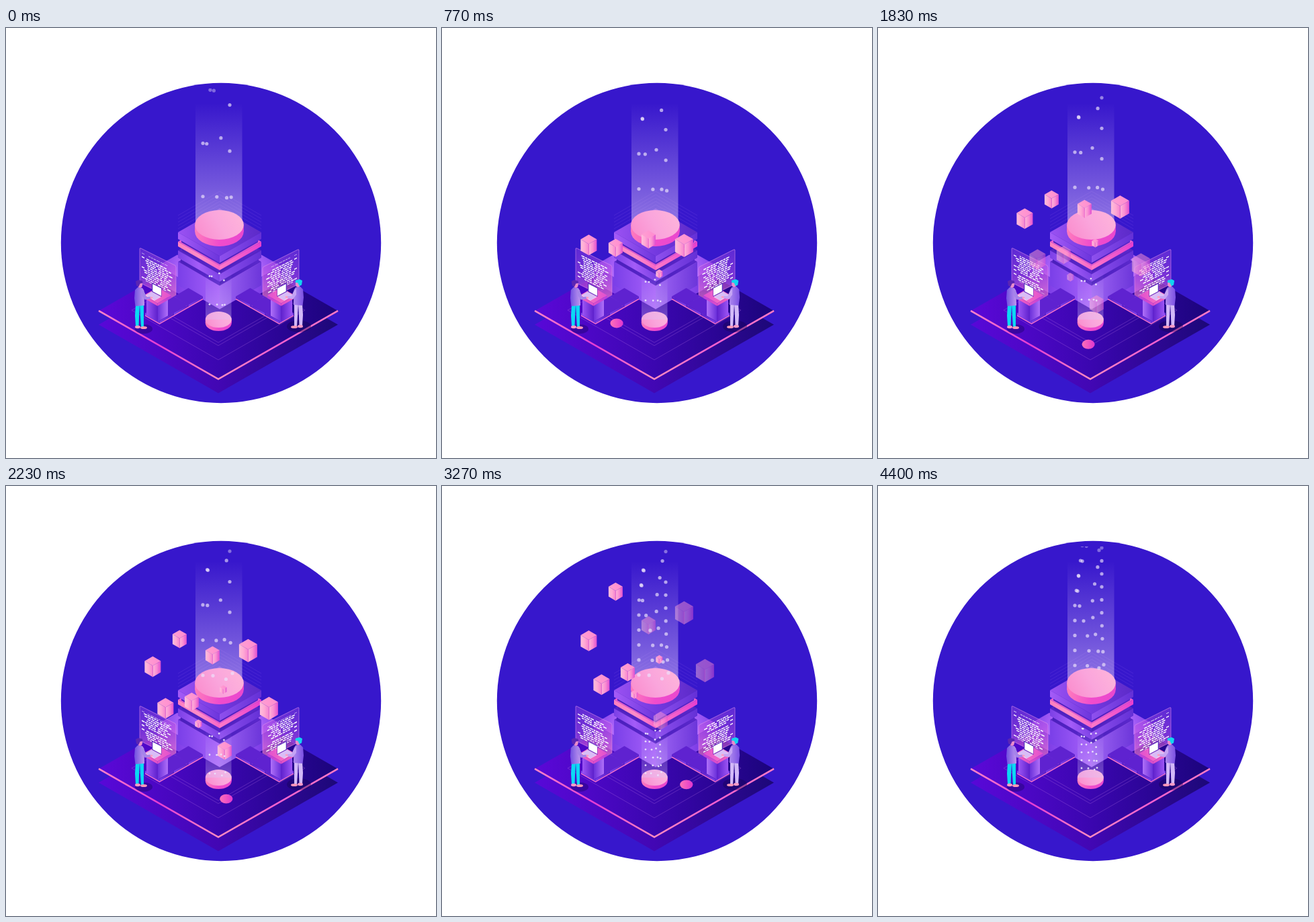
Animation, 640 px wide and 640 px high, one loop 4430 ms. Source, as an HTML page with a canvas:

```html
<!DOCTYPE html>
<html lang="en">
<head>
<meta charset="utf-8">
<title>Data tower</title>
<style>
  html, body { margin: 0; width: 100%; height: 100%; overflow: hidden; background: #fff; }
  canvas { display: block; width: 640px; height: 640px; }
</style>
</head>
<body>
<canvas id="stage" width="640" height="640"></canvas>
<script>
const LOOP = 4430;
const SLOPE = .573; // rise per pixel of every isometric edge
const ctx = document.getElementById('stage').getContext('2d');

// ---------- helpers ----------
const clamp = v => Math.max(0, Math.min(1, v));

function grad(x1, y1, x2, y2, ...colors) {
  const g = ctx.createLinearGradient(x1, y1, x2, y2);
  colors.forEach((c, i) => g.addColorStop(i / (colors.length - 1), c));
  return g;
}
const across = (x1, x2, ...colors) => grad(x1, 0, x2, 0, ...colors);

function poly(points, fill) {
  ctx.fillStyle = fill;
  ctx.fill(new Path2D('M' + points + 'Z'));
}
function line(points, stroke, width) {
  ctx.strokeStyle = stroke;
  ctx.lineWidth = width;
  ctx.stroke(new Path2D('M' + points));
}
function oval(x, y, rx, ry, fill) {
  ctx.fillStyle = fill;
  ctx.beginPath();
  ctx.ellipse(x, y, rx, ry, 0, 0, 7);
  ctx.fill();
}
function group(draw) {
  ctx.save();
  draw();
  ctx.restore();
}
function mirrored(draw, dx = 0, dy = 0) {
  group(() => {
    ctx.translate(635 + dx, dy);
    ctx.scale(-1, 1);
    draw();
  });
}

const diamond = (x, y, r) =>
  `${x - r},${y} ${x},${y - r * SLOPE} ${x + r},${y} ${x},${y + r * SLOPE}Z`;

// Isometric box from its left top corner: a runs to the front, b from there to the right.
function box(x, y, a, b, h, top, left, right) {
  const fx = x + a, fy = y + a * SLOPE, rx = fx + b, ry = fy - b * SLOPE;
  poly(`${x},${y} ${x + b},${y - b * SLOPE} ${rx},${ry} ${fx},${fy}`, top);
  poly(`${x},${y} ${fx},${fy} ${fx},${fy + h} ${x},${y + h}`, across(x, fx, ...left));
  poly(`${fx},${fy} ${rx},${ry} ${rx},${ry + h} ${fx},${fy + h}`, across(fx, rx, ...right));
}

// ---------- floor ----------
function floor() {
  oval(320, 320, 238.2, 238.2, '#3717cc');
  poly(diamond(316, 441.5, 178), across(138, 494, '#5808d8', '#4207b4', '#1c0878'));
  poly(diamond(316, 421, 178), across(138, 494, '#5b08d8', '#3b06b0', '#1b047c'));
  line('138,420.8 316,522.6 494,420.8',
    across(138, 494, '#ff86c8', '#e43bd4', '#ff8cc0', '#f45fd0', '#ff7cc4'), 2.6);
  for (const r of [129, 92, 84]) line(diamond(316, 420, r), 'rgba(190,120,230,.42)', .7);
  oval(205, 448, 13, 7, 'rgba(30,5,110,.45)');
  oval(436, 444, 18, 9, 'rgba(20,4,80,.4)');
}

// A puck slides down to the front corner, then up the other side.
function puck(t) {
  const d = (t - 1890) * (t < 1890 ? .05 : .0346);
  const x = 316 + d, y = 472.5 - Math.abs(d) * .59;
  oval(x, y, 9.6, 6.9, across(x - 9, x + 9, '#ff6fb8', '#e038cf'));
}

// ---------- tower ----------
function slab(y, h, top, left, right, inset = 0) {
  const r = 62 - inset;
  box(318 - r, y, r, r, h, top, left, right);
}
function wing() {
  box(226, 354, 46, 29, 24, grad(226, 340, 300, 370, '#7a38e6', '#b169fb', '#9553f0'),
    ['#6426d6', '#8e4cf0'], ['#a45cf6', '#7d3fe4']);
}
function tower() {
  wing();
  mirrored(wing);
  const dark = ['#4a1fbc', '#5a28cc'], violet = ['#7a3fe8', '#a862fa'], shade = ['#8f50ee', '#6430d6'];
  slab(348, 35, '#5a27c8', violet, ['#a066f4', '#6c36da']);
  slab(338, 11, '#5a27c8', dark, dark, 4);
  slab(331, 11, '#5524c4', ['#7c40e6', '#a45cf8', '#7a3ee4'], shade);
  slab(322, 10, '#4a1fbc', dark, dark, 6);
  slab(318, 7, '#e85ad0', ['#ff7fbe', '#ff8cc8', '#f866c8'], ['#ff79c8', '#e63fcf']);
  slab(310, 9, '#4a1fbc', dark, dark, 5);
  slab(304, 10, across(256, 380, '#9b52f2', '#7439e0', '#5c2ac8'), ['#a55cf8', '#6c35dc'], shade);
  for (let y = 299; y > 278; y -= 5)
    line(`256,${y} 318,${y - 36} 380,${y}`, 'rgba(165,110,240,.24)', .7);
}
function beam(x, y, w, h, alpha) {
  ctx.fillStyle = grad(0, y, 0, y + h, 'rgba(218,195,248,0)', `rgba(218,195,248,${alpha})`);
  ctx.fillRect(x, y, w, h);
}
function disc(x, y, rx, ry, h) {
  const side = across(x - rx, x + rx, '#ff7cbc', '#f04ccc', '#ea48ce');
  oval(x, y + h, rx, ry, side);
  ctx.fillStyle = side;
  ctx.fillRect(x - rx, y, rx * 2, h);
  oval(x, y, rx, ry, grad(x - rx, y + ry, x + rx, y - ry, '#fa8acb', '#faa5dc', '#ffb6da'));
}

// ---------- code screens ----------
function random(seed) {
  return () => (seed = (seed * 16807) % 2147483647) / 2147483647;
}
const ROWS = 13, PITCH = 3, CYCLE = (ROWS + 1) * PITCH;

function codeRows(rnd) {
  return Array.from({ length: ROWS }, (_, i) => {
    const last = i === ROWS - 1;
    const row = last || i % 5 === 0 ? [[3, 4]] : [];
    const end = last ? 40 : 36 + rnd() * 13;
    for (let x = last ? 13 : 6 + rnd() * 6, w; x < end; x += w + (rnd() < .12 ? 3 : 1)) {
      w = 2 + rnd() * 3.5;
      row.push([x, w]);
    }
    return row;
  });
}
const code = codeRows(random(4711));

function screen(t) {
  ctx.transform(1, .5, 0, 1, 199, 327);
  ctx.beginPath();
  ctx.roundRect(0, 0, 54, 52, 2);
  ctx.fillStyle = grad(0, 0, 40, 56, 'rgba(150,70,225,.4)', 'rgba(190,80,225,.5)', 'rgba(255,130,205,.65)');
  ctx.fill();
  ctx.strokeStyle = 'rgba(225,145,235,.6)';
  ctx.lineWidth = .9;
  ctx.stroke();
  ctx.beginPath();
  ctx.rect(1, 6, 52, 39);
  ctx.clip();
  ctx.fillStyle = '#fff';
  const scroll = (1 - t / LOOP) * CYCLE;
  code.forEach((row, i) => {
    const y = (scroll + 7 + i * PITCH) % CYCLE + 4;
    for (const [x, w] of row) ctx.fillRect(x, y, w, 1.6);
  });
}

// ---------- desks and people ----------
function desk() {
  for (let i = 2; i >= 0; i--) {
    const x = 207 + i * 21.5, y = 424 - i * 12.3;
    box(x, y, 21.5, 21.5, 4, '#5f22d0', ['#8a48ee', '#6a2cda'], ['#7d3fe8', '#5a20c8']);
    line(`${x},${y + 4} ${x + 21.5},${y + 16.3} ${x + 43},${y + 4}`, '#ff74c8', 1.4);
  }
  box(209, 401, 17, 15, 26, '#5a1fc6', ['#9d55f5', '#5d20cc'], ['#6b30da', '#b070f8']);
  box(205, 398, 20.5, 20.5, 4, across(205, 246, '#ff7cc0', '#e04fcf'),
    ['#f565c0', '#e04fc8'], ['#e04fc8', '#b83fdc']);
  box(208, 397.5, 13, 9, .8, '#d9bdf6', ['#fff', '#fff'], ['#e9d4fb', '#fff']);
  poly('217,379 231.5,386.5 231.5,400 217,392.5', '#5d2fc0');
  poly('218.3,381 231,387.5 231,398.8 218.3,392', '#fff');
}
function person(look, lean) {
  poly('193,411 199,411 198,431 197.5,444 193,444 192,428', look.leg);
  poly('199,411 205,411 205,428 205,446 201,446 200,430', look.leg);
  oval(196, 445, 4, 2.2, '#f79ac6');
  oval(205, 446, 5, 2, '#ff96b8');
  ctx.transform(1, 0, lean / 60, 1, -412 * lean / 60, 0);
  poly('192,390 196,386 203,387 205.5,391 206,413 192.5,414 191,402', across(191, 207, ...look.body));
  poly('202,389 206,393 209,400 216,400 216,403 207,404.5 202,398', look.arm);
  oval(216.5, 401.5, 2, 1.4, '#ff9fc4');
  oval(199.5, 382, 3.6, 4.8, '#e98ccb');
  poly('193,377 197,375 203,376.5 203.5,379.5 199.5,380.5 197.5,385 194,383.5', look.hair);
}
const leftLook = { leg: '#0bd8f4', body: ['#6f4fe0', '#c59cf0'], arm: '#a584ea', hair: '#5a25b4' };
const rightLook = { leg: '#d2b8f8', body: ['#7a4fe2', '#b08cf0'], arm: '#c4a4f4', hair: '#12d4f0' };

// ---------- cubes ----------
// Two flights; each cube has x, its height halfway, width and speed.
const flights = [
  { start: 120, cubes: [[218, 269, 24, .037], [258, 228, 21, .068], [307, 252, 21, .043], [360, 245, 27, .054], [323, 303, 10, .043]] },
  { start: 1600, cubes: [[237, 331, 24, .034], [276, 321, 21, .042], [325, 394, 21, .043], [391, 331, 27, .054], [286, 354, 10, .042]] }
];
function cube(t, start, [x, y, w, speed]) {
  const end = x > 300 && w > 10 ? 3000 : 3800; // the large right ones fade first
  const a = w / 2, b = w * .64, m = w * .35, f = b - 2 * m;
  group(() => {
    ctx.translate(x + .4, y - (t - 2230) * speed);
    ctx.globalAlpha = Math.min(clamp((t - start) / 450), 1 - clamp((t - end) / 520));
    poly(`0,${-b} ${a},${-m} 0,${f} ${-a},${-m}`, across(-a, a, '#ffa0d2', '#ff8bd0'));
    poly(`${-a},${-m} 0,${f} 0,${b} ${-a},${m}`, across(-a, 0, '#ffbedc', '#ffa8d4', '#f582d0'));
    poly(`0,${f} ${a},${-m} ${a},${m} 0,${b}`, across(0, a, '#ffb4da', '#fa8cd2', '#e04fd0'));
    line(`0,${f} 0,${b}`, '#ea5cca', .7);
  });
}

// ---------- rising dots ----------
// Every wave sends one dot up each lane: y is the lane's foot, k its pace, x(y) its path.
const bend = (y, mid, reach, top, half) => mid + reach * Math.cos(Math.PI * (y - top) / half);
const lanes = [
  { y: 289, k: 1.154, x: y => 293 + 11 * clamp((172 - y) / 80) },
  { y: 289.5, k: 1.152, x: y => bend(y, 305.5, 8.5, 245, 92) },
  { y: 295.6, k: 1.296, x: y => bend(y, 324, 5, 265, 85) },
  { y: 285, k: 1, x: y => 333 + 4.5 * clamp((y - 180) / 105) ** 2 }
];
// Waves come sparsely at first, then steadily, then in a rush.
const pause = birth => birth < -300 ? 526 : birth < 2100 ? 348 : 148;

function dots(t, alpha, top) {
  ctx.beginPath();
  ctx.rect(270, top, 100, 230);
  ctx.clip();
  for (let birth = -1305; birth < t; birth += pause(birth)) {
    const s = (t - birth) * .1305;
    for (const { y, k, x } of lanes) {
      const dy = y - k * s;
      ctx.globalAlpha = alpha * clamp(s / 2) * (.6 + .4 * clamp((dy - 95) / 20));
      oval(x(dy), dy, 2.6, 2.6, '#ece2fb');
    }
  }
}

// ---------- scene ----------
function draw(t) {
  const lean = .35 - .35 * Math.cos(t / LOOP * 4 * Math.PI);
  ctx.clearRect(0, 0, 640, 640);
  floor();
  puck(t);
  tower();
  beam(282, 112, 69.5, 181, .55);
  disc(317.5, 293, 36.3, 22, 10);
  disc(316.3, 434, 19.5, 12, 5);
  beam(297, 362, 38.5, 72, .36);
  group(() => screen(t));
  mirrored(() => screen(t), 0, 2);
  desk();
  mirrored(desk);
  group(() => person(leftLook, lean));
  mirrored(() => person(rightLook, lean), -1, -1);
  for (const { start, cubes } of flights) cubes.forEach(c => cube(t, start, c));
  group(() => dots(t, .68, 90));
  group(() => {
    ctx.translate(303 - 293 * .535, 412 - 252 * .53);
    ctx.scale(.535, .53);
    dots(t, .95, 154);
  });
}

const start = performance.now();
function tick() {
  draw((performance.now() - start) % LOOP);
  requestAnimationFrame(tick);
}
tick();
</script>
</body>
</html>
```
